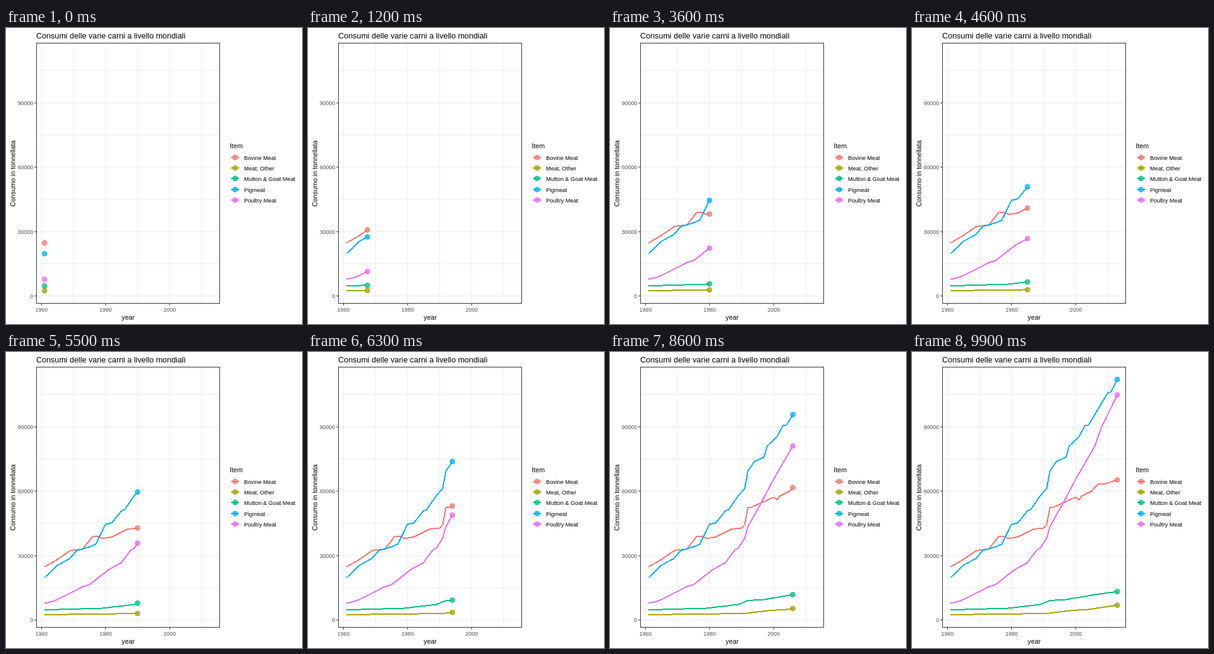
These frames come from a looping animation (480 px wide and 480 px high, 10 s). An HTML page:

```html
<!DOCTYPE html>
<html lang="it">
<head>
<meta charset="utf-8">
<title>Consumi delle varie carni</title>
<style>
  html, body { margin: 0; width: 100%; height: 100%; overflow: hidden; background: #fff; }
  svg { display: block; width: 480px; height: 480px; font-family: "Liberation Sans", Arial, sans-serif; }
  .grid { stroke: #ebebeb; }
  .tick, .border { stroke: #333; fill: none; }
  .line { fill: none; stroke-width: 2; stroke-linejoin: round; }
  .grid, .tick, .border, .line { shape-rendering: crispEdges; }
  .dot { fill-opacity: .75; stroke-opacity: .9; }
  .label { font-size: 9px; fill: #4d4d4d; }
  .name { font-size: 9.3px; }
  .head { font-size: 10.8px; }
  .title { font-size: 12.85px; }
</style>
</head>
<body>
<svg id="chart" viewBox="0 0 480 480"></svg>
<script>
const svg = document.getElementById('chart');
const YEARS = 52, FRAMES = 100, FRAME_MS = 100;
const xOf = k => 62.5 + 5.2 * k;   // k = years since 1961

function add(tag, attrs, text) {
  const el = document.createElementNS('http://www.w3.org/2000/svg', tag);
  for (const [key, value] of Object.entries(attrs)) el.setAttribute(key, value);
  if (text) el.textContent = text;
  return svg.appendChild(el);
}

const line = (cls, x1, y1, x2, y2) => add('line', { class: cls, x1, y1, x2, y2 });
const label = (cls, x, y, text, more = {}) => add('text', { class: cls, x, y, ...more }, text);
const dot = (cx, cy, color) => add('circle', { class: 'dot', cx, cy, r: 4, fill: color, stroke: color });
const middle = { 'text-anchor': 'middle' };

// Turning points of a curve: year offset to stage height, straight in between.
function series(name, color, turns) {
  const keys = Object.keys(turns).map(Number);
  const y = k => {
    const i = Math.max(1, keys.findIndex(key => key >= k));
    const a = keys[i - 1], b = keys[i];
    return turns[a] + (turns[b] - turns[a]) * (k - a) / (b - a);
  };
  return { name, color, y };
}

const all = [
  series('Bovine Meat', '#F8766D', {
    0: 348.5, 4: 336.5, 8: 322, 12: 319.5, 15: 299, 17: 299, 18: 302.5,
    21: 300, 26: 287, 29: 285.5, 30: 280, 31: 252, 32: 252, 36: 242.5,
    39: 235.5, 40: 239.5, 41: 233.5, 44: 225.5, 46: 214, 48: 214, 52: 207.5 }),
  series('Meat, Other', '#A3A500', { 0: 426, 30: 424, 38: 419, 43: 417.5, 52: 410.5 }),
  series('Mutton & Goat Meat', '#00BF7D', {
    0: 418.2, 18: 415.5, 28: 409.5, 31: 403, 36: 401.5, 45: 393.5, 52: 388.5 }),
  series('Pigmeat', '#00B0F6', {
    0: 366, 4: 346, 8: 334.5, 10: 322, 14: 316, 16: 311.5, 19: 279.5, 21: 277,
    24: 257.5, 25: 255.5, 28: 233, 30: 221, 31: 193, 33: 177.5, 36: 170.5, 37: 152.5,
    40: 138, 42: 118.5, 43: 118.5, 45: 101.5, 49: 66.5, 50: 65, 52: 44.5 }),
  series('Poultry Meat', '#E76BF3', {
    0: 407.5, 3: 403.8, 9: 388.5, 12: 380.3, 14: 377.5, 20: 353, 24: 341.5, 27: 320.5,
    28: 318, 30: 302, 31: 283, 35: 246, 39: 206.5, 45: 152.5, 47: 123, 52: 69.5 })
];

// Grid and axes
for (let i = 0; i < 6; i++) {
  const x = 57.5 + 52 * i;
  line('grid', x, 25, x, 446);
  if (i % 2 === 0) {
    line('tick', x, 447, x, 450);
    label('label', x, 460, 1960 + 10 * i, middle);
  }
}
for (let i = 0; i < 8; i++) {
  const y = Math.floor(434.43 - 52.21 * i) + .5;
  line('grid', 50, y, 346, y);
  if (i % 2 === 0) {
    line('tick', 46, y, 49, y);
    label('label', 44, y + 3.5, String(15000 * i), { 'text-anchor': 'end' });
  }
}
label('title', 49, 17, 'Consumi delle varie carni a livello mondiali');
label('head', 198, 473, 'year', middle);
label('head', 0, 0, 'Consumo in tonnellata', { ...middle, transform: 'translate(15 236) rotate(-90)' });

// Legend
label('head', 363, 195, 'Item');
all.forEach((s, i) => {
  const y = Math.round(210 + 17.2 * i);
  add('path', { class: 'line', d: `M365 ${y}H378`, stroke: s.color });
  dot(371.5, y, s.color);
  label('name', 386, y + 4, s.name);
});

// Moving parts: all lines lie below all dots, the border above both
for (const s of all) s.path = add('path', { class: 'line', stroke: s.color });
for (const s of all) s.dot = dot(0, 0, s.color);
add('rect', { class: 'border', x: 49.5, y: 24.5, width: 297, height: 422 });

// Each year falls on a whole frame; frames in between are interpolated.
const frameOf = k => Math.round(k * (FRAMES - 1) / YEARS);

function yearAt(frame) {
  let k = 0;
  while (k < YEARS && frameOf(k + 1) <= frame) k++;
  if (k === YEARS) return k;
  return k + (frame - frameOf(k)) / (frameOf(k + 1) - frameOf(k));
}

let shown = -1;
function draw(now) {
  const frame = Math.floor(now / FRAME_MS) % FRAMES;
  if (frame !== shown) {
    shown = frame;
    const end = yearAt(frame);
    for (const s of all) {
      const points = [];
      for (let k = 0; k < end; k++) points.push(`${xOf(k)} ${s.y(k)}`);
      points.push(`${xOf(end)} ${s.y(end)}`);
      s.path.setAttribute('d', 'M' + points.join('L'));
      s.dot.setAttribute('cx', xOf(end));
      s.dot.setAttribute('cy', s.y(end));
    }
  }
  requestAnimationFrame(() => draw(performance.now()));
}
draw(performance.now());
</script>
</body>
</html>
```
